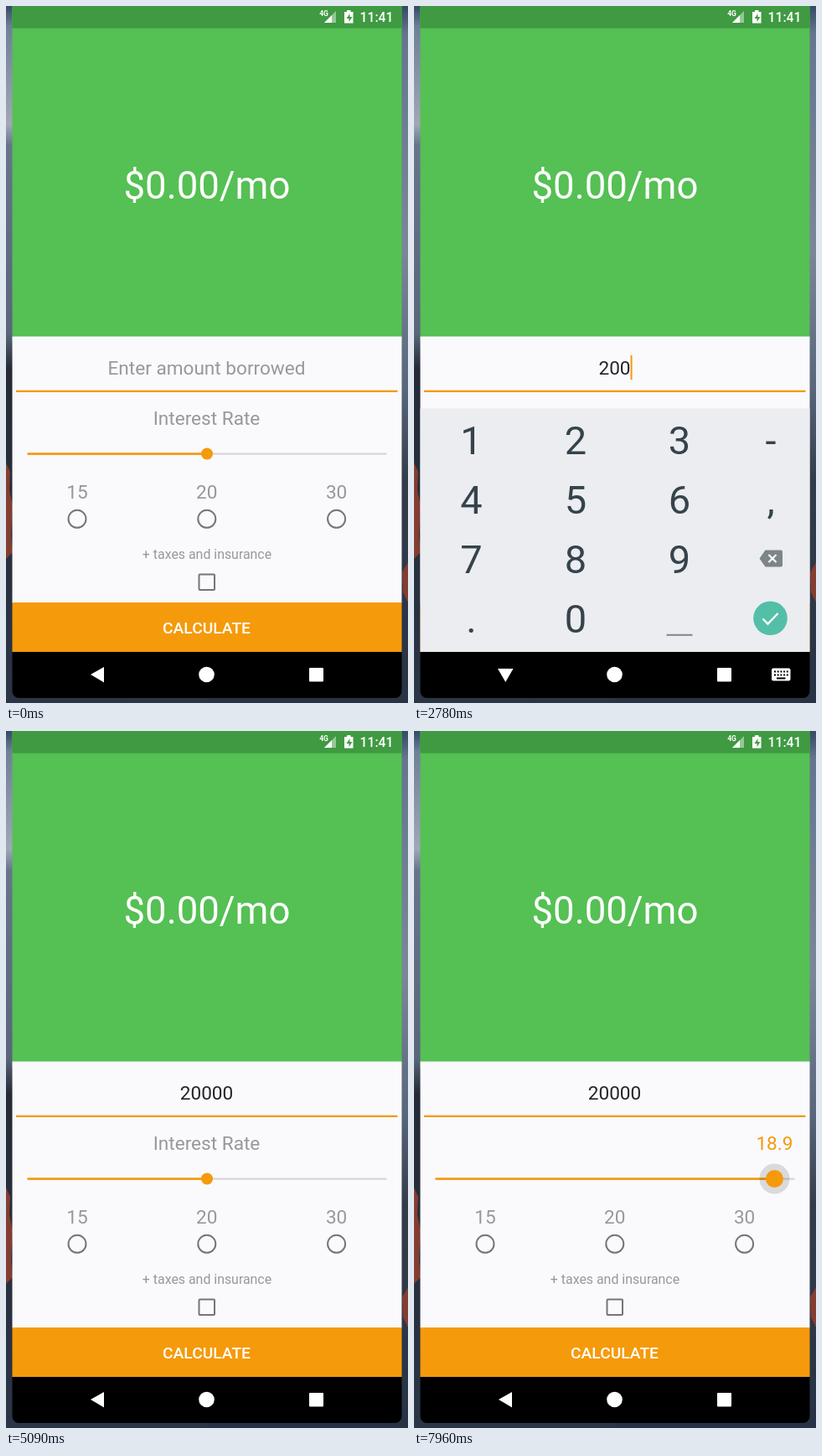
Recreate the animation shown at these times as an HTML page. Size 480x832 px, loop 8000 ms.

```html
<!DOCTYPE html>
<html lang="en">
<head>
<meta charset="utf-8">
<title>Loan calculator</title>
<style>
  html, body { margin: 0; width: 100%; height: 100%; overflow: hidden; background: #20252f; }
  svg { display: block; width: 100%; height: 100%; }
  text { font-family: Roboto, Arial, sans-serif; text-anchor: middle; }
  .field { font-size: 22.6px; }
  .hint { fill: #98989a; }
  .outline { fill: none; stroke: #757577; stroke-width: 2; }
  .accent { fill: #f59a0b; }
  .keys { font-size: 47px; fill: #35434b; }
</style>
</head>
<body>
<svg viewBox="0 0 480 832" preserveAspectRatio="none">
  <defs>
    <linearGradient id="left" x2="0" y2="1">
      <stop offset="0" stop-color="#344b63"/>
      <stop offset=".03" stop-color="#6f8098"/>
      <stop offset=".17" stop-color="#a0a8b5"/>
      <stop offset=".2" stop-color="#66758c"/>
      <stop offset=".47" stop-color="#59667b"/>
      <stop offset=".52" stop-color="#252a36"/>
      <stop offset="1" stop-color="#2a3546"/>
    </linearGradient>
    <linearGradient id="right" x2="0" y2="1">
      <stop offset="0" stop-color="#344b63"/>
      <stop offset=".04" stop-color="#64768f"/>
      <stop offset=".35" stop-color="#7b8798"/>
      <stop offset=".55" stop-color="#59667a"/>
      <stop offset=".68" stop-color="#333c4b"/>
      <stop offset="1" stop-color="#273344"/>
    </linearGradient>
    <clipPath id="phone"><path d="M7.5 0H472.5V818a8 8 0 0 1-8 8H15.5a8 8 0 0 1-8-8Z"/></clipPath>
  </defs>

  <rect width="240" height="832" fill="url(#left)"/>
  <rect x="240" width="240" height="832" fill="url(#right)"/>
  <g fill="#843d31">
    <path d="M0 545L5 556 4 578 8 596 6 632 8 652 0 660Z"/>
    <path d="M480 664L473 676 474 700 480 712Z"/>
  </g>

  <g clip-path="url(#phone)">
    <rect width="480" height="400" fill="#55c054"/>
    <rect width="480" height="26.5" fill="#3f9a41"/>
    <g fill="#fff">
      <text x="379.5" y="12" font-size="8.5" font-weight="700">4G</text>
      <path d="M394 6V20H380Z" opacity=".45"/>
      <path d="M389 11V20H380Z"/>
      <path d="M407 5h4.500v2h3v13.500h-10.500v-13.500h3Z"/>
      <path d="M410.500 9l-4 6h3v4l4-6h-3Z" fill="#3f9a41"/>
      <text x="442.5" y="19.200" font-size="15.800" font-weight="500">11:41</text>
      <text x="240" y="229.500" font-size="45.500">$0.00/mo</text>
    </g>

    <rect y="394.500" width="480" height="318" fill="#faf9fc"/>
    <text id="amount" class="field" x="239.500" y="440"></text>
    <rect id="caret" class="accent" x="271" y="417" width="2" height="29"/>
    <rect class="accent" x="12" y="458.700" width="455.500" height="2.300"/>
    <text id="rate" class="field" y="499.500"></text>

    <rect x="26" y="533.500" width="428.500" height="2.200" fill="#d6d5d9"/>
    <rect id="filled" class="accent" x="25.500" y="533.300" height="2.600"/>
    <circle id="halo" cy="534.500" fill="#000" opacity=".13"/>
    <circle id="thumb" class="accent" cy="534.500"/>

    <g id="terms" class="field hint"></g>
    <text class="hint" x="240" y="660" font-size="15.900">+ taxes and insurance</text>
    <rect class="outline" x="230.500" y="678.500" width="18.500" height="18.500" rx="1"/>

    <rect class="accent" y="712" width="480" height="59.500"/>
    <text x="239.500" y="749" font-size="19.200" font-weight="500" fill="#fff">CALCULATE</text>
    <rect y="771" width="480" height="61"/>

    <g id="keyboard">
      <rect y="480.500" width="480" height="290.500" fill="#ecedf1"/>
      <rect id="pressed" x="136" width="115.500" height="53.500" fill="#d2d3d7"/>
      <g id="keys" class="keys"></g>
      <rect x="301.500" y="749.800" width="31" height="2" fill="#7f878c"/>
      <path d="M412.500 659.500L419.500 649.500H438a2 2 0 0 1 2 2V667.500a2 2 0 0 1-2 2H419.500Z" fill="#7d858a"/>
      <path d="M423.500 655l9 9m0-9l-9 9" stroke="#fff" stroke-width="2.200"/>
      <circle cx="425.500" cy="730.800" r="20.300" fill="#54bfa8"/>
      <path d="M416.500 731.500l6 6 12-12.500" fill="none" stroke="#fff" stroke-width="2.300"/>
    </g>

    <g fill="#fff">
      <path id="back"/>
      <circle cx="239.500" cy="798" r="9.300"/>
      <rect x="362" y="790" width="17" height="16.500" rx="1"/>
      <g id="switcher">
        <rect x="427" y="790.500" width="22.500" height="15" rx="2"/>
        <path d="M430 794.500H447M430 798.500H447" stroke="#000" stroke-width="2" stroke-dasharray="2 1.700"/>
        <path d="M433 802.500H443.500" stroke="#000" stroke-width="1.800"/>
      </g>
    </g>
  </g>
</svg>

<script>
const LOOP = 8000;
const SHOW = 1155, HIDE = 4676, SLIDE = 150, DROP = 58;
const TYPED = [2060, 2500, 2750, 3000, 3250];
const PRESS = 6600, DRAG = [6750, 7850];
const TRACK = { x: 26, width: 428, max: 20 };

const $ = id => document.getElementById(id);
const set = (id, attrs) => {
  for (const name in attrs) $(id).setAttribute(name, attrs[name]);
};
const ramp = (t, from, to) => Math.min(1, Math.max(0, (t - from) / (to - from)));
const visible = on => ({ visibility: on ? 'visible' : 'hidden' });

const label = (x, y, text) => `<text x="${x}" y="${y}">${text}</text>`;
$('terms').innerHTML = [15, 20, 30].map((years, i) => {
  const x = 85 + 154.8 * i;
  return label(x, 588, years) + `<circle class="outline" cx="${x}" cy="612.300" r="10.500"/>`;
}).join('');
$('keys').innerHTML = ['123-', '456,', '789', '.0'].map((row, r) =>
  [...row].map((key, c) => label([68.5, 193, 317, 426][c], 535 + 71 * r, key)).join('')
).join('');

function drawKeyboard(t) {
  const enter = 1 - (1 - ramp(t, SHOW, SHOW + SLIDE)) ** 2;
  const leave = ramp(t, HIDE, HIDE + SLIDE) ** 2;
  const shown = enter - leave;
  set('keyboard', { transform: `translate(0 ${DROP * (1 - shown)})`, opacity: shown });

  const open = t >= SHOW && t < HIDE;
  set('back', { d: open ? 'M100 791H118.500L109.300 807Z' : 'M101 798L117 789V807.500Z' });
  set('switcher', visible(open));

  const key = TYPED.findIndex(at => t >= at - 100 && t < at + 10);
  set('pressed', { y: key > 0 ? 703.5 : 490.5, opacity: key < 0 ? 0 : 1 });
}

function drawAmount(t) {
  const count = TYPED.filter(at => t >= at).length;
  $('amount').textContent = '20000'.slice(0, count) || 'Enter amount borrowed';
  set('amount', { fill: count ? '#252527' : '#98989a' });

  const sinceKey = t - TYPED[count - 1];
  set('caret', {
    x: 239.5 + count * 6.35,
    ...visible(count > 0 && t < 4750 && sinceKey % 1000 < 500)
  });
}

function drawSlider(t) {
  const p = ramp(t, ...DRAG);
  const eased = p * p * (3 - 2 * p);
  const value = Math.round((10 + 8.9 * eased) * 10) / 10;
  const x = TRACK.x + TRACK.width * value / TRACK.max;
  const grown = ramp(t, PRESS, PRESS + 120);
  const active = t >= PRESS;
  set('filled', { width: x - 25.5 });
  set('thumb', { cx: x, r: 7 + 3.5 * grown });
  set('halo', { cx: x, r: 18 * grown });
  set('rate', { x: active ? x : 239.5, fill: active ? '#f59a0b' : '#98989a' });
  $('rate').textContent = active ? value.toFixed(1) : 'Interest Rate';
}

function frame(now) {
  const t = now % LOOP;
  drawKeyboard(t);
  drawAmount(t);
  drawSlider(t);
  requestAnimationFrame(frame);
}
frame(0);
</script>
</body>
</html>
```
